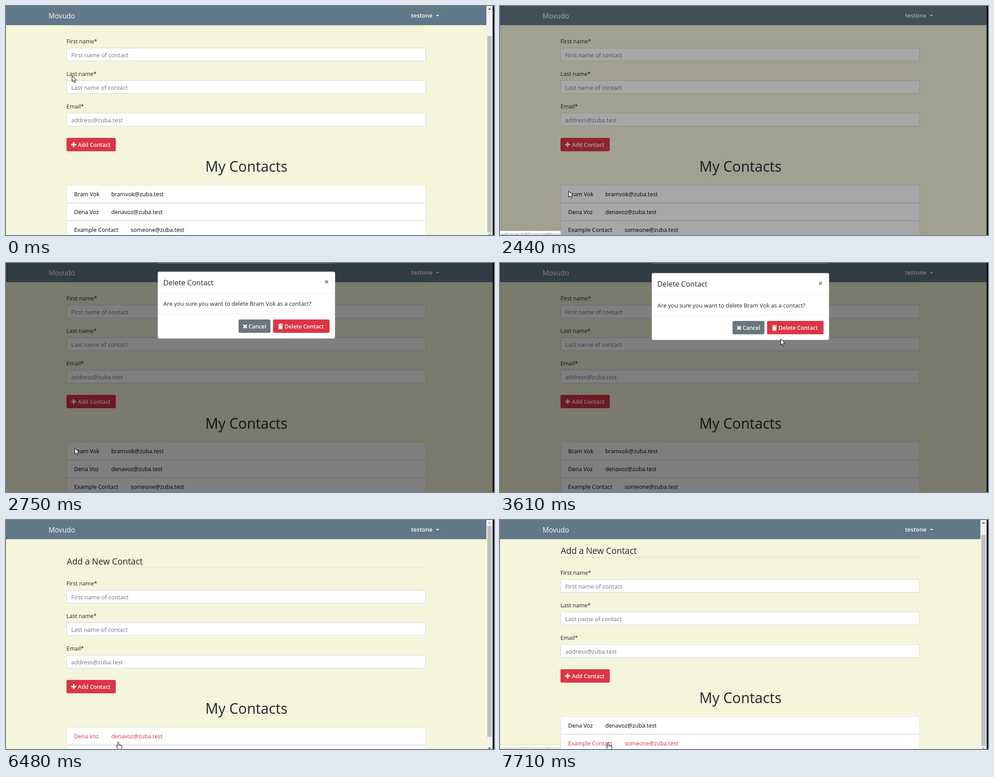
Animation of 1089 by 514 pixels, one loop 8000 ms. Source, as an HTML page:

```html
<!DOCTYPE html>
<html lang="en">
<head>
<meta charset="utf-8">
<title>Contacts</title>
<style>
  html, body { margin: 0; width: 100%; height: 100%; overflow: hidden; background: #f5f5dc; }
  svg { display: block; width: 1089px; height: 514px; }
  text { font-family: "Open Sans", "Noto Sans", sans-serif; white-space: pre; }
</style>
</head>
<body>
<svg id="stage" viewBox="0 0 1089 514" xmlns="http://www.w3.org/2000/svg"></svg>
<script>
const LOOP = 8000;
const RED = '#dc3545', DARK_RED = '#c82333', INK = '#212529', LINK = '#dc2f3c';
const OPEN = 2300, RELOAD = 5790;

const text = (x, y, size, fill, str, more = '') =>
  `<text x="${x}" y="${y}" font-size="${size}" fill="${fill}" ${more}>${str}</text>`;
const rect = (x, y, w, h, fill, more = '') =>
  `<rect x="${x}" y="${y}" width="${w}" height="${h}" fill="${fill}" ${more}/>`;
const bold = 'font-weight="600"';

const field = (y, label, hint) =>
  text(135, y, 12.5, INK, label) +
  rect(135.5, y + 10.5, 801, 29, '#fff', 'rx="3" stroke="#ced4da"') +
  text(145.5, y + 31, 13, '#6c757d', hint);

const contacts = [
  ['Bram Vok', 235, 'bramvok@zuba.test'],
  ['Dena Voz', 235, 'denavoz@zuba.test'],
  ['Example Contact', 278, 'someone@zuba.test']
];
const row = ([name, x, mail], i) => `<g id="row${i}">` +
  rect(135.5, .5, 801, 39, '#fff', 'rx="3" stroke="#dfdfdf"') +
  text(152, 25, 12.6, 'inherit', name).replace('fill="inherit"', '') +
  text(x, 25, 12.6, 'inherit', mail).replace('fill="inherit"', '') + '</g>';

const page = `<g id="page">
  ${text(135.5, 100, 19.2, INK, 'Add a New Contact')}
  ${rect(135, 107, 802, 1, '#e0dfca')}
  ${field(147, 'First name*', 'First name of contact')}
  ${field(220, 'Last name*', 'Last name of contact')}
  ${field(293, 'Email*', 'address@zuba.test')}
  ${rect(135, 359, 110, 30, RED, 'rx="3" id="add"')}
  <path id="plus" d="M145.5 374H156.5M151 368.5V379.5" stroke="#fff" stroke-width="3.2"/>
  ${text(160.5, 378.5, 12.3, '#fff', 'Add Contact', bold + ' id="addText"')}
  ${text(536.5, 434.5, 32, INK, 'My Contacts', 'text-anchor="middle"')}
  ${contacts.map(row).join('')}
</g>`;

const nav = rect(0, 0, 1086, 43, '#617889') +
  text(95, 28, 15.5, '#fff', 'Movudo') +
  text(904, 26, 13, '#fff', 'testone', bold) +
  '<path d="M959.5 20H966.5L963 23.6Z" fill="#fff"/>';

const scrollbar = `<g id="bar">
  ${rect(1072, 0, 14, 514, '#f1f1f1')}
  <path id="up" d="M1075.5 8L1079 4.5L1082.5 8Z"/>
  <path id="down" d="M1075.5 511L1079 514.5L1082.5 511Z"/>
  ${rect(1074, 13, 10, 474, '#c1c1c1', 'id="thumb"')}
</g>`;

const modal = `<g id="modal">
  ${rect(338.5, 22.5, 396, 150.5, '#fff', 'rx="4" stroke="#000" stroke-opacity=".2"')}
  ${rect(339, 71, 395, 1, '#e9ecef')}
  ${rect(339, 117, 395, 1, '#e9ecef')}
  ${text(351, 53, 16.3, INK, 'Delete Contact')}
  <path d="M712.5 42.5L718.5 48.5M718.5 42.5L712.5 48.5" stroke="#7f7f7f" stroke-width="2.2"/>
  ${text(351.5, 99.5, 12.8, INK, 'Are you sure you want to delete Bram Vok as a contact?')}
  ${rect(519, 130, 71, 30, '#6c757d', 'rx="3"')}
  <path d="M529.8 142L537.2 149.4M537.2 142L529.8 149.4" stroke="#fff" stroke-width="3"/>
  ${text(541.5, 150, 12.3, '#fff', 'Cancel', bold)}
  ${rect(594.5, 128.5, 129, 33, 'none', 'rx="4.5" stroke="#e15361" stroke-width="3" id="ring"')}
  ${rect(596, 130, 126, 30, RED, 'rx="3" id="del"')}
  <path d="M607 140.5H610L611 139.2H614L615 140.5H618V142.3H607ZM607.8 143.2H617.2L616.6 152H608.4Z" fill="#fff"/>
  ${text(621.5, 150, 12.3, '#fff', 'Delete Contact', bold)}
</g>`;

const status = `<g id="status">
  ${rect(-1, 504.5, 137, 20, '#fff', 'rx="2" stroke="#bbb" id="statusBox"')}
  ${text(2, 516, 8.6, '#6b6b6b', '', 'id="statusText"')}
</g>`;

const pointer = `<g id="pointer" stroke="#000" fill="#fff" stroke-linejoin="round">
  <path id="arrow" d="M0 0V13.5L3.1 10.7L5.2 15.6L7.3 14.7L5.2 9.9H9.5Z"/>
  <g id="hand">
    <path d="M-1.6 10V1a1.5 1.5 0 0 1 3 0V6q2-.8 2.6.6q1.8-.6 2.4.6q1.6-.2 1.6 1.6V12q0 2-1.4 3.4V17.5H0V15.5L-4.6 10q-.8-1.4.4-2q1-.4 2.6 2z"/>
    <path d="M1.4 6V9M4 6.6V9M6.4 7.2V9.5" fill="none" stroke-width=".8"/>
  </g>
</g>`;

document.getElementById('stage').innerHTML =
  rect(0, 0, 1089, 514, '#f5f5dc') + page + nav + scrollbar +
  rect(0, 0, 1086, 514, '#000', 'id="shade"') +
  rect(338, 0, 396, 1, '#fff', 'id="edge" opacity=".3"') +
  modal + status + rect(1086, 0, 3, 514, '#000') + pointer;

const $ = id => document.getElementById(id);
const set = (id, attrs) => {
  for (const k in attrs) $(id).setAttribute(k, attrs[k]);
};
const show = (id, on) => set(id, { visibility: on ? 'visible' : 'hidden' });
const clamp = v => Math.max(0, Math.min(1, v));
const smooth = p => p * p * (3 - 2 * p);

// Pointer legs: first step, last step, step count, end x, end y
const legs = [
  [1040, 1580, 8, 140, 416],
  [1670, 1820, 3, 153, 415],
  [2990, 2990, 1, 529, 242],
  [3310, 3310, 1, 717, 42],
  [3380, 3530, 3, 607, 165],
  [3610, 3610, 1, 626, 170],
  [3760, 4080, 5, 638, 153],
  [6170, 6480, 5, 250, 498],
  [7330, 7480, 3, 248, 450],
  [7560, 7710, 3, 241, 499]
];

function pointerAt(t) {
  let x = 147, y = 156;
  for (const [a, b, n, ex, ey] of legs) {
    if (t < a) break;
    const k = n > 1 ? Math.min(n - 1, Math.floor((t - a + 1) / (b - a) * (n - 1))) : 0;
    const p = smooth((k + 1) / n);
    x += (ex - x) * p;
    y += (ey - y) * p;
  }
  return [x, y];
}

// Value of the last step that has begun
const stepAt = (steps, t) => steps.reduce((v, s) => t >= s[0] ? s : v);

const scrolls = [[0, 63], [RELOAD, 0], [6850, 2], [6930, 8], [7030, 17], [7100, 22], [7170, 24]];
const url = 'webserver:5050/contacts#Popup';
const messages = [
  [0, 0, 136, ''],
  [1820, .4, 136, url],
  [1920, 1, 136, url],
  [2680, 0, 136, ''],
  [4000, .5, 136, url],
  [4080, 1, 136, url],
  [5320, 1, 360, 'Waiting for server...'],
  [5550, 1, 360, 'Waiting for cache...'],
  [RELOAD, 0, 136, ''],
  [6630, .5, 136, url],
  [6710, 1, 136, url],
  [7330, 0, 136, ''],
  [7710, .5, 136, url]
];

function draw(t) {
  const open = t >= OPEN && t < RELOAD;
  const loaded = t >= RELOAD;
  const scroll = stepAt(scrolls, t)[1];
  const [x, y] = pointerAt(t);
  const inside = (l, top, w, h) => x >= l && x < l + w && y >= top && y < top + h;
  // Hover is only refreshed once the pointer moves again
  const hoverScroll = loaded && t < 7330 ? 0 : scroll;

  set('page', { transform: `translate(0 ${-scroll})` });

  let hot = false;
  contacts.forEach((c, i) => {
    const top = 465 + 40 * (loaded ? i - 1 : i);
    const on = !open && inside(135, top - hoverScroll, 802, 40);
    hot = hot || on;
    show('row' + i, !(loaded && i === 0));
    set('row' + i, { transform: `translate(0 ${top})`, fill: on ? LINK : '#000' });
  });

  const overAdd = !open && inside(135, 359 - hoverScroll, 110, 30);
  const icons = t < RELOAD || t >= 5940;
  set('add', { fill: overAdd ? DARK_RED : RED, width: icons ? 110 : 98 });
  set('addText', { x: icons ? 160.5 : 148.5 });
  show('plus', icons);

  show('bar', !open);
  set('thumb', { y: 13 + scroll * .865, height: loaded ? 474 : 441 });
  set('up', { fill: scroll ? '#505050' : '#a3a3a3' });
  set('down', { fill: scroll === (loaded ? 24 : 63) ? '#a3a3a3' : '#505050' });

  const q = OPEN + Math.floor((t - OPEN) / 73) * 73;
  const slide = clamp((q - 2495) / 300);
  set('shade', { opacity: open ? .5 * clamp((q - 2270) / 150) : 0 });
  set('modal', {
    opacity: open ? clamp((q - 2495) / 130) : 0,
    transform: `translate(0 ${-40 * Math.pow(1 - slide, 1.5)})`
  });
  show('edge', open && t >= 2600);

  const overDel = open && t >= 3310 && inside(596, 130, 126, 30);
  const focus = clamp((Math.floor((t - 4780) / 70) + 1) / 3);
  set('del', { fill: overDel ? DARK_RED : RED });
  set('ring', { opacity: .5 * focus });

  const [, alpha, width, words] = stepAt(messages, t);
  set('status', { opacity: alpha });
  set('statusBox', { width: width + .5 });
  $('statusText').textContent = words;

  const link = hot || overAdd || overDel;
  const seen = t < 3070 || t >= 3310;
  set('pointer', { transform: `translate(${Math.round(x) + .5} ${Math.round(y) + .5})` });
  show('arrow', seen && !link);
  show('hand', seen && link);
}

const start = performance.now();
function frame() {
  draw((performance.now() - start) % LOOP);
  requestAnimationFrame(frame);
}
frame();
</script>
</body>
</html>
```
